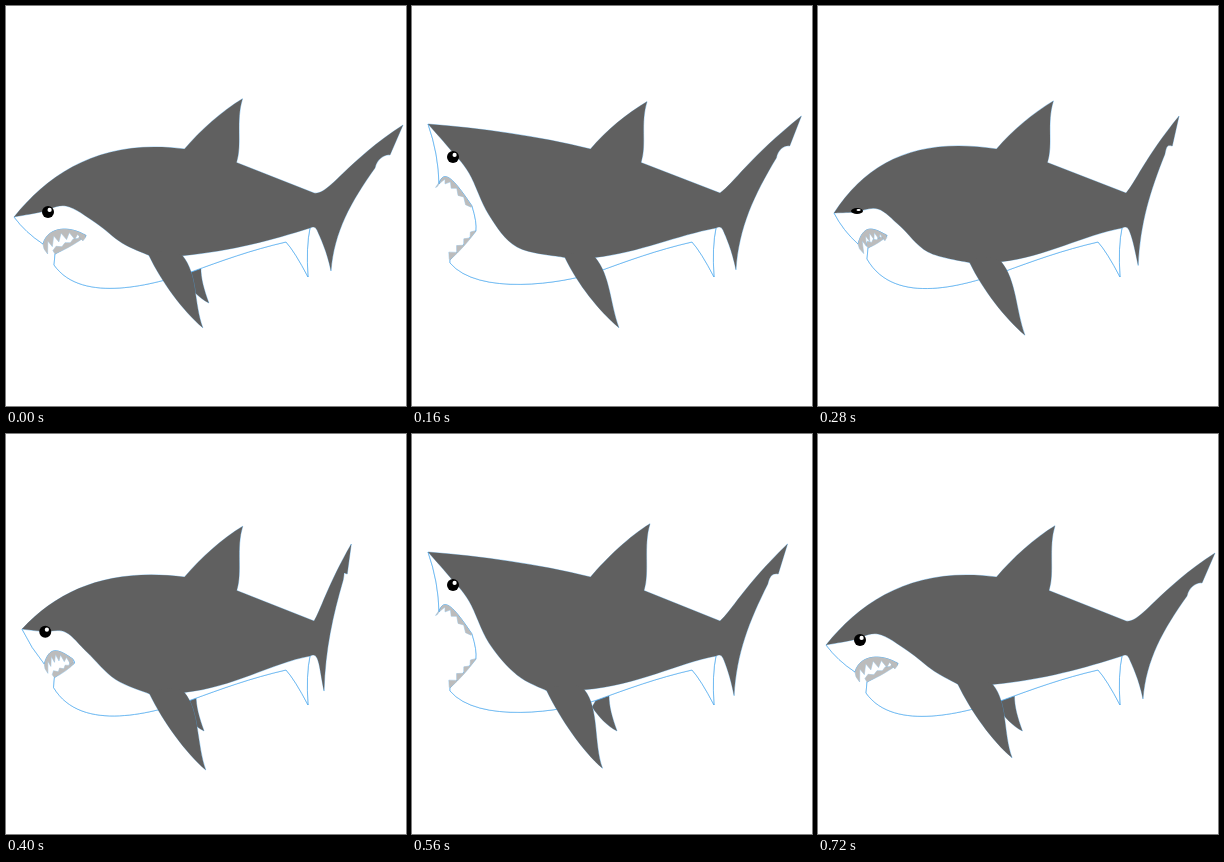
Write an HTML page with a canvas that moves like this. It is 400 px wide and 400 px high and loops after 0.76 s.

```html
<!DOCTYPE html>
<html lang="en">
<head>
<meta charset="utf-8">
<title>Shark</title>
<style>
html, body { margin: 0; width: 100%; height: 100%; overflow: hidden; background: #fff; }
canvas { display: block; width: 400px; height: 400px; }
</style>
</head>
<body>
<canvas id="stage"></canvas>
<script>
const LOOP = 760, STEP = 40;
const GREY = '#606060', LINE = '#4ba8ee', GUM = '#bcbcbc';

const stage = document.getElementById('stage');
const ctx = stage.getContext('2d');
const ratio = window.devicePixelRatio || 1;
stage.width = stage.height = 400 * ratio;
ctx.scale(ratio, ratio);

const add = (p, x, y) => [p[0] + x, p[1] + y];
const mix = (a, b, u, w = u) => [a[0] + (b[0] - a[0]) * u, a[1] + (b[1] - a[1]) * w];
const curve = (path, a, b, c) => path.bezierCurveTo(...a, ...b, ...c);

// Eased rise from 0 to 1 between two times.
function ramp(t, from, to) {
  const u = Math.min(1, Math.max(0, (t - from) / (to - from)));
  return (1 - Math.cos(Math.PI * u)) / 2;
}
const wave = (t, delay) => Math.sin(2 * Math.PI * (t - delay) / LOOP);

// All motion comes from a few drivers: two bites, a lunge, a tail sweep and fin sway.
function poseAt(t) {
  const bite = ramp(t, 0, 160) - ramp(t, 160, 280) + ramp(t, 350, 560) - ramp(t, 560, 720);
  const lunge = 1 - ramp(t, 0, 160) + ramp(t, 560, 720);
  const sweep = 1 - ramp(t, 80, 400) + ramp(t, 385, 700);
  const blink = ramp(t, 200, 280) - ramp(t, 280, 360);
  const key = (shut, open, shift) => mix(add(shut, shift[0] * lunge, shift[1] * lunge), open, bite);
  const sway = wave(t, 30), dip = wave(t, 230), lift = wave(t, 0);

  const upper = [345 + 52 * sweep, 110 + 9 * lunge];
  return {
    bite, lunge, blink, upper,
    snout: key([16, 207], [16, 118], [-8, 4]),
    face: [
      key([37, 206], [37, 142], [-2, 0]),
      key([60, 203], [57, 167], [0, -3]),
      key([82, 220], [77, 209], [8, -3]),
      key([110, 246], [105, 241], [6, -9])
    ],
    eye: key([39, 205], [41, 151], [3, 1]),
    lip: key([40, 238], [27, 178], [-3, 0]),
    gumEnd: key([68, 229], [60, 200], [11, 0]),
    corner: key([69, 230], [64, 225], [11, 0]),
    jaw: key([49, 253], [38, 257], [-1, 6]),
    front: [144 + 9.5 * wave(t, 15), 254.5 + 5.5 * dip],
    rear: [178 + 6 * sway, 254 + 4.5 * dip],
    tip: [199 + 9 * sway, 328.5 + 8.5 * wave(t, 270)],
    farTip: [200 - 6 * wave(t, 60), 297],
    topFront: [178.5, 143],
    topTip: [236.5 - 1.5 * lift, 92.7 + 3 * lift],
    topRear: [230.5 - 1.5 * lift, 156.5],
    base: [308, 187],
    notch: add(upper, -4 - 9 * sweep, 30),
    inner: add(upper, -8 - 20 * sweep, 36 + 7 * sweep),
    lower: [318 + 7 * sweep, 257 + 8 * sweep]
  };
}

function spline(path, pts) {
  for (let i = 0; i < pts.length - 1; i++) {
    const p = pts[i], q = pts[i + 1], o = pts[i - 1] || p, r = pts[i + 2] || q;
    curve(path, add(p, (q[0] - o[0]) / 6, (q[1] - o[1]) / 6),
      add(q, (p[0] - r[0]) / 6, (p[1] - r[1]) / 6), q);
  }
}

// Outlines go down first, so joined shapes show no seam.
function paint(fill, width, ...paths) {
  ctx.strokeStyle = LINE;
  ctx.lineWidth = width;
  paths.forEach(path => ctx.stroke(path));
  ctx.fillStyle = fill;
  paths.forEach(path => ctx.fill(path));
}

function along([a, b, c, d], u) {
  const bc = mix(b, c, u);
  return mix(mix(mix(a, b, u), bc, u), mix(bc, mix(c, d, u), u), u);
}

// A gum along a curve, with a row of teeth square to its chord.
function teeth(pts, count, side, band, length) {
  const path = new Path2D(), [a, , , d] = pts;
  const span = Math.hypot(d[0] - a[0], d[1] - a[1]) / side;
  const nx = (a[1] - d[1]) / span, ny = (d[0] - a[0]) / span;
  path.moveTo(...a);
  curve(path, pts[1], pts[2], d);
  for (let k = count * 2; k >= 0; k--) {
    const u = k / (count * 2), h = (k % 2 ? length : band) * (1 - 0.5 * u);
    path.lineTo(...add(along(pts, u), nx * h, ny * h));
  }
  path.closePath();
  paint(GUM, 0.4, path);
}

const chinOf = ({ jaw, bite }) => add(jaw, 1 - bite, -11 + 8 * bite);
const gumOf = ({ lip, gumEnd, bite }) =>
  [lip, add(lip, 5, -18), add(gumEnd, -15, -9 - 13 * bite), gumEnd];

function farFin({ farTip }) {
  const path = new Path2D(), root = add(farTip, -8, -36);
  path.moveTo(...root);
  curve(path, add(root, 0, 12), add(farTip, -5, -14), farTip);
  curve(path, add(farTip, -10, -5), add(farTip, -18, -14), add(farTip, -25, -24));
  path.lineTo(...add(root, -10, 0));
  path.closePath();
  return path;
}

function belly(p) {
  const path = new Path2D(), { snout, lip, jaw, corner, bite, lunge } = p;
  const gum = gumOf(p);
  path.moveTo(...snout);
  path.quadraticCurveTo(...add(mix(snout, lip, 0.5), 8 * bite - 3, 2 - 2 * bite), ...lip);
  curve(path, ...gum.slice(1));
  path.quadraticCurveTo(...add(corner, 1, -9 * bite), ...corner);
  path.lineTo(...chinOf(p));
  path.lineTo(...jaw);
  curve(path, [jaw[0] + 28, 302 - 12 * bite - 3 * lunge], [150, 278], [185, 266]);
  curve(path, [215, 255], [245, 244], [280, 236]);
  path.quadraticCurveTo(289, 246, 302, 271);
  path.quadraticCurveTo(300, 240, 304, 222);
  return path;
}

function body(p) {
  const path = new Path2D();
  const { snout, topFront, topTip, topRear, base, upper, notch, inner, lower, rear } = p;
  const bulge = (1 - p.bite) ** 2, dx = upper[0] - base[0];
  path.moveTo(...snout);
  curve(path,
    add(mix(snout, topFront, 0.33), -19 * bulge, -4 - 28 * bulge + 8 * p.lunge),
    add(mix(snout, topFront, 0.67), -24 * bulge, -5 - 28 * bulge), topFront);
  curve(path, add(topFront, 16, -19), add(topTip, -20, 12), topTip);
  curve(path, add(topTip, -7, 22), add(topRear, 6, -18), topRear);
  path.lineTo(...base);
  curve(path, add(base, dx * 0.16, -9 + 12 * p.lunge), mix(base, upper, 0.36, 0.46), upper);
  path.lineTo(...notch);
  curve(path, add(notch, -5, -1), add(inner, 2, -9), inner);
  curve(path, mix(lower, inner, 0.45, 0.67), mix(lower, inner, 0.07, 0.38), lower);
  curve(path, add(lower, -4, -20), [314, 231], [311, 224]);
  path.quadraticCurveTo(309, 219, 304, 222);
  curve(path, [266, 229 + 5 * p.lunge], [227, rear[1] - 5], rear);
  path.lineTo(...p.front);
  spline(path, [p.front, ...p.face.slice().reverse(), snout]);
  path.closePath();
  return path;
}

function nearFin({ front, tip, rear }) {
  const path = new Path2D();
  path.moveTo(...front);
  curve(path, add(front, 13, 27), add(tip, -20, -17), tip);
  curve(path, add(tip, -9, -25), add(rear, 15, 18), rear);
  path.lineTo(...add(rear, -8, -5));
  path.lineTo(...add(front, 4, -4));
  path.closePath();
  return path;
}

function drawMouth(p) {
  const { corner, bite } = p, chin = chinOf(p);
  const lowerGum = [chin, ...[0.35, 0.7].map(u => add(mix(chin, corner, u), 1, 1)), corner];
  teeth(lowerGum, 4, -1, 4 - 3 * bite, 7);
  teeth(gumOf(p), 6, 1, 5 - 2 * bite, 15 - 6 * bite);
}

function disc(x, y, rx, ry, fill) {
  ctx.beginPath();
  ctx.ellipse(x, y, rx, ry, 0, 0, Math.PI * 2);
  ctx.fillStyle = fill;
  ctx.fill();
}

function drawEye({ eye: [x, y], blink }) {
  const ry = 6 - 3 * blink;
  disc(x, y, 6, ry, '#000');
  disc(x + 1.6, y - ry * 0.35, 2.1, ry * 0.35, '#fff');
}

function draw(t) {
  const p = poseAt(t);
  ctx.clearRect(0, 0, 400, 400);
  paint(GREY, 0.5, farFin(p));
  const under = belly(p);
  paint('#fff', 0, under);
  ctx.lineWidth = 0.7;
  ctx.stroke(under);
  paint(GREY, 0.5, body(p), nearFin(p));
  drawMouth(p);
  drawEye(p);
}

function tick() {
  draw(Math.floor(performance.now() % LOOP / STEP) * STEP);
  requestAnimationFrame(tick);
}
tick();
</script>
</body>
</html>
```
